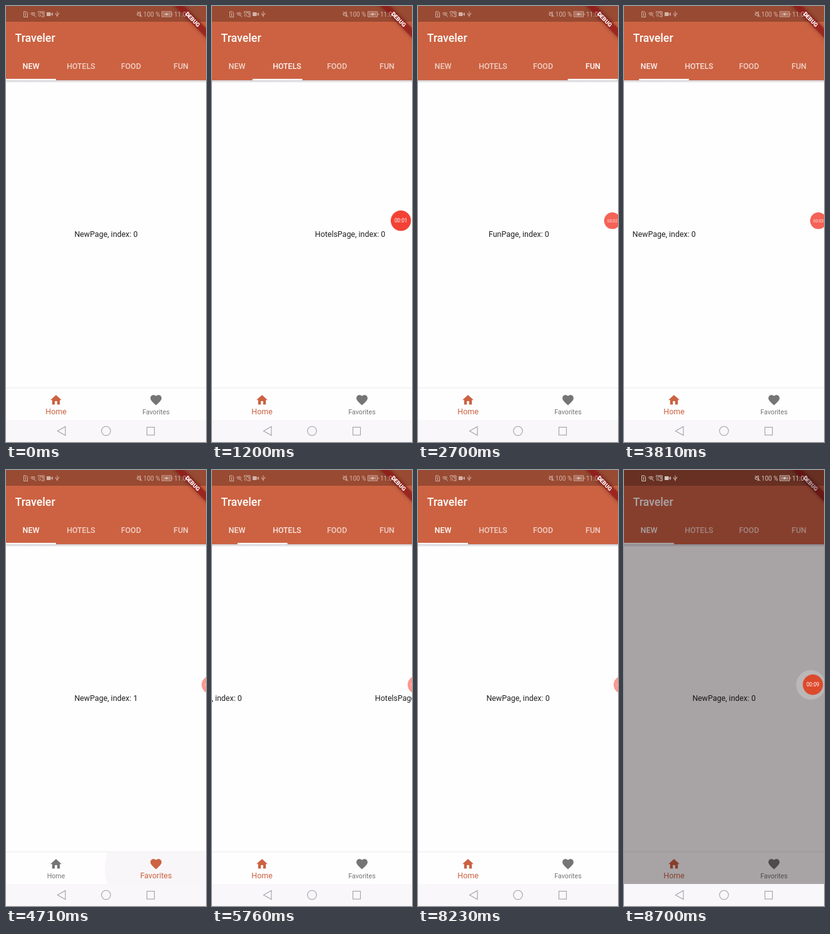
Write an HTML page with a canvas that moves like this. It is 320 px wide and 693 px high and loops after 8.8 s.

```html
<!DOCTYPE html>
<html lang="en">
<head>
<meta charset="utf-8">
<title>Tabbed app</title>
<style>
  html, body { margin: 0; width: 100%; height: 100%; overflow: hidden; background: #fefefe; }
  canvas { display: block; width: 320px; height: 693px; }
</style>
</head>
<body>
<canvas id="stage"></canvas>
<script>
const W = 320, H = 693, LOOP = 8800;
const DP = 320 / 360;
const ORANGE = [204, 98, 66], GREY = [117, 117, 117], WHITE = [255, 255, 255];
const TABS = ['New', 'Hotels', 'Food', 'Fun'];

// Start times in ms
const SWIPES_LEFT = [1010, 1680, 2324, 5666];
const SWIPES_RIGHT = [2800, 3230, 3662, 7740];
const NAV_TAPS = [4500, 5040, 6480, 6880];
const SWIPE_MS = 450, PRESS_AT = 8700;

const HOME = new Path2D('M10 20v-6h4v6h5v-8h3L12 3 2 12h3v8z');
const HEART = new Path2D('M12 21.35l-1.45-1.32C5.4 15.36 2 12.28 2 8.5 2 5.42 4.42 3 7.5 3c1.74 0 3.41.81 4.5 2.09C13.09 3.81 14.76 3 16.5 3 19.58 3 22 5.42 22 8.5c0 3.78-3.4 6.86-8.55 11.54z');

const canvas = document.getElementById('stage');
const ctx = canvas.getContext('2d');
const scale = window.devicePixelRatio || 1;
canvas.width = W * scale;
canvas.height = H * scale;

const clamp = v => Math.min(1, Math.max(0, v));
const mix = (a, b, k) => a + (b - a) * k;
const mixColor = (a, b, k) => `rgb(${a.map((v, i) => Math.round(mix(v, b[i], k)))})`;
const rgba = (c, a) => `rgba(${c},${a})`;
const ramp = (t, start, ms) => clamp((t - start) / ms);
const easeOut = k => 1 - (1 - k) ** 3;
const sum = (list, fn) => list.reduce((total, v) => total + fn(v), 0);

function pageAt(t) {
  const progress = start => easeOut(ramp(t, start, SWIPE_MS));
  return sum(SWIPES_LEFT, progress) - sum(SWIPES_RIGHT, progress);
}

function rect(x, y, w, h, fill) {
  ctx.fillStyle = fill;
  ctx.fillRect(x, y, w, h);
}

function disc(x, y, r, fill) {
  ctx.beginPath();
  ctx.arc(x, y, r, 0, Math.PI * 2);
  ctx.fillStyle = fill;
  ctx.fill();
}

function arc(x, y, r, from, to) {
  ctx.beginPath();
  ctx.arc(x, y, r, from * Math.PI, to * Math.PI);
  ctx.stroke();
}

function text(str, x, y, size, fill, weight = 400, align = 'center') {
  ctx.font = `${weight} ${size}px Roboto, sans-serif`;
  ctx.textAlign = align;
  ctx.fillStyle = fill;
  ctx.fillText(str, x, y);
}

const stroke = d => ctx.stroke(new Path2D(d));

function pen(color, width = 1) {
  ctx.strokeStyle = color;
  ctx.lineWidth = width;
}

function shade(y, h, from, to) {
  const g = ctx.createLinearGradient(0, y, 0, y + h);
  g.addColorStop(0, from);
  g.addColorStop(1, to);
  rect(0, y, W, h, g);
}

function drawAppBar(page) {
  shade(118, 4.5, 'rgba(20,10,40,.2)', 'rgba(20,10,40,0)');
  rect(0, 0, W, 118, rgba(ORANGE, 1));
  rect(0, 0, W, 25, 'rgba(0,0,0,.25)');
  text('Traveler', 14.4, 57, 20 * DP, '#fff', 500, 'left');
  TABS.forEach((name, i) => {
    const lit = clamp(1 - Math.abs(i - page));
    text(name.toUpperCase(), 40 + i * 80, 100, 14 * DP, rgba(WHITE, .7 + .3 * lit), 500);
  });
  rect(page * 80, 115.8, 80, 2.2, '#fff');
}

function drawPages(page, index) {
  TABS.forEach((name, i) => {
    if (Math.abs(i - page) < 1) text(`${name}Page, index: ${index}`, 160 + (i - page) * W, 367.3, 14 * DP, '#202020');
  });
}

function drawNavItem(icon, label, x, selected) {
  const color = mixColor(GREY, ORANGE, selected);
  ctx.save();
  ctx.translate(x - 12 * DP, 615.6);
  ctx.scale(DP, DP);
  ctx.fillStyle = color;
  ctx.fill(icon);
  ctx.restore();
  text(label, x, 648.6, mix(12, 14, selected) * DP, color);
}

function drawRipple(age, x) {
  if (age < 0) return;
  ctx.save();
  ctx.beginPath();
  ctx.rect(0, 608, W, 50);
  ctx.clip();
  disc(x, 633, Math.min(90, 20 + age * .22), rgba([110, 80, 120], .055 * clamp((480 - age) / 250)));
  ctx.restore();
}

function drawBottomBar(t) {
  shade(604.5, 3.5, 'rgba(0,0,0,0)', 'rgba(0,0,0,.05)');
  rect(0, 608, W, 50, '#fefefe');
  NAV_TAPS.forEach((tap, i) => drawRipple(t - tap + 70, i % 2 ? 80 : 240));
  const favorite = sum(NAV_TAPS, tap => ramp(t, tap, 200) * (NAV_TAPS.indexOf(tap) % 2 ? -1 : 1));
  drawNavItem(HOME, 'Home', 80, 1 - favorite);
  drawNavItem(HEART, 'Favorites', 240, favorite);
}

function drawSystemButtons() {
  rect(0, 658, W, 35, '#f9f7fa');
  pen('#a3a1a5', 1.1);
  stroke('M95 668.5V682.5L82.5 675.5Z');
  arc(160, 675.5, 7.2, 0, 2);
  ctx.strokeRect(225.5, 669.5, 12, 12.5);
}

function drawBanner() {
  ctx.save();
  ctx.translate(W, 0);
  ctx.rotate(Math.PI / 4);
  ctx.scale(DP, DP);
  ctx.shadowColor = 'rgba(0,0,0,.5)';
  ctx.shadowBlur = 6 * scale;
  rect(-48, 28, 96, 12, 'rgba(160,24,26,.68)');
  ctx.shadowColor = 'transparent';
  text('DEBUG', 0, 37.6, 10.2, '#fff', 900);
  ctx.restore();
}

function drawStatus(alpha) {
  const color = rgba(WHITE, alpha);
  pen(color);
  stroke('M28.5 9h4l2 2v6.5h-6zM31.5 11v5');
  for (const r of [2, 4, 6]) arc(43, 16.5, r, 1.25, 1.75);
  stroke('M45 14l2.5 3.5');
  stroke('M51.5 11V9h9.5v8h-4M54 11h5v4');
  for (const r of [2, 4.5]) arc(51.5, 17, r, 1.5, 2);
  rect(65, 10, 6.5, 6, color);
  stroke('M72 13l2.5-2v4zM82 8.5v9M79.5 11.5v2l2.5 2M84.5 11v2l-2.5 1.5');
  stroke('M210 11.5h2l3-2.5v8l-3-2.5h-2zM210 8.5l8 9');
  text('100 %', 219.8, 16.8, 10, color, 400, 'left');
  ctx.strokeRect(249.5, 9, 15, 8);
  rect(251, 10.5, 12, 5, rgba(WHITE, alpha * .55));
  stroke('M266 11.5v3M255 13h4M257 11v4');
  text('11:00', 269, 16.8, 10, color, 400, 'left');
}

function drawRecorder(t, pressed) {
  const shrink = pressed ? 0 : ramp(t, 2150, 200);
  const hide = pressed ? 0 : ramp(t, 4400, 250);
  const x = 302.2 + shrink * 8.8 + hide * 16;
  const r = 16.2 - shrink * 3 + hide * .8;
  const seconds = pressed ? 9 : Math.floor(t / 1000 + .1);
  if (pressed) disc(299, 341.5, 23.5, 'rgba(235,232,234,.27)');
  ctx.save();
  ctx.globalAlpha = ramp(t, 50, 150) * (1 - shrink * .17 - hide * .29);
  disc(x, 341.3, r, pressed ? '#dc4a2c' : '#f34235');
  text(`00:0${seconds}`, x, 344.2, r * .51, '#fff');
  ctx.restore();
}

function draw(t) {
  const page = pageAt(t);
  const index = NAV_TAPS.filter(tap => tap <= t).length % 2;
  const pressed = t >= PRESS_AT;
  ctx.setTransform(scale, 0, 0, scale, 0, 0);
  rect(0, 0, W, H, '#fefefe');
  drawAppBar(page);
  drawBottomBar(t);
  drawPages(page, index);
  drawBanner();
  if (pressed) rect(0, 0, W, 658, 'rgba(12,0,6,.355)');
  drawStatus(pressed ? .72 : .58);
  drawSystemButtons();
  if (t >= 100) drawRecorder(t, pressed);
}

const start = performance.now();
function tick() {
  draw((performance.now() - start) % LOOP);
  requestAnimationFrame(tick);
}
tick();
</script>
</body>
</html>
```
